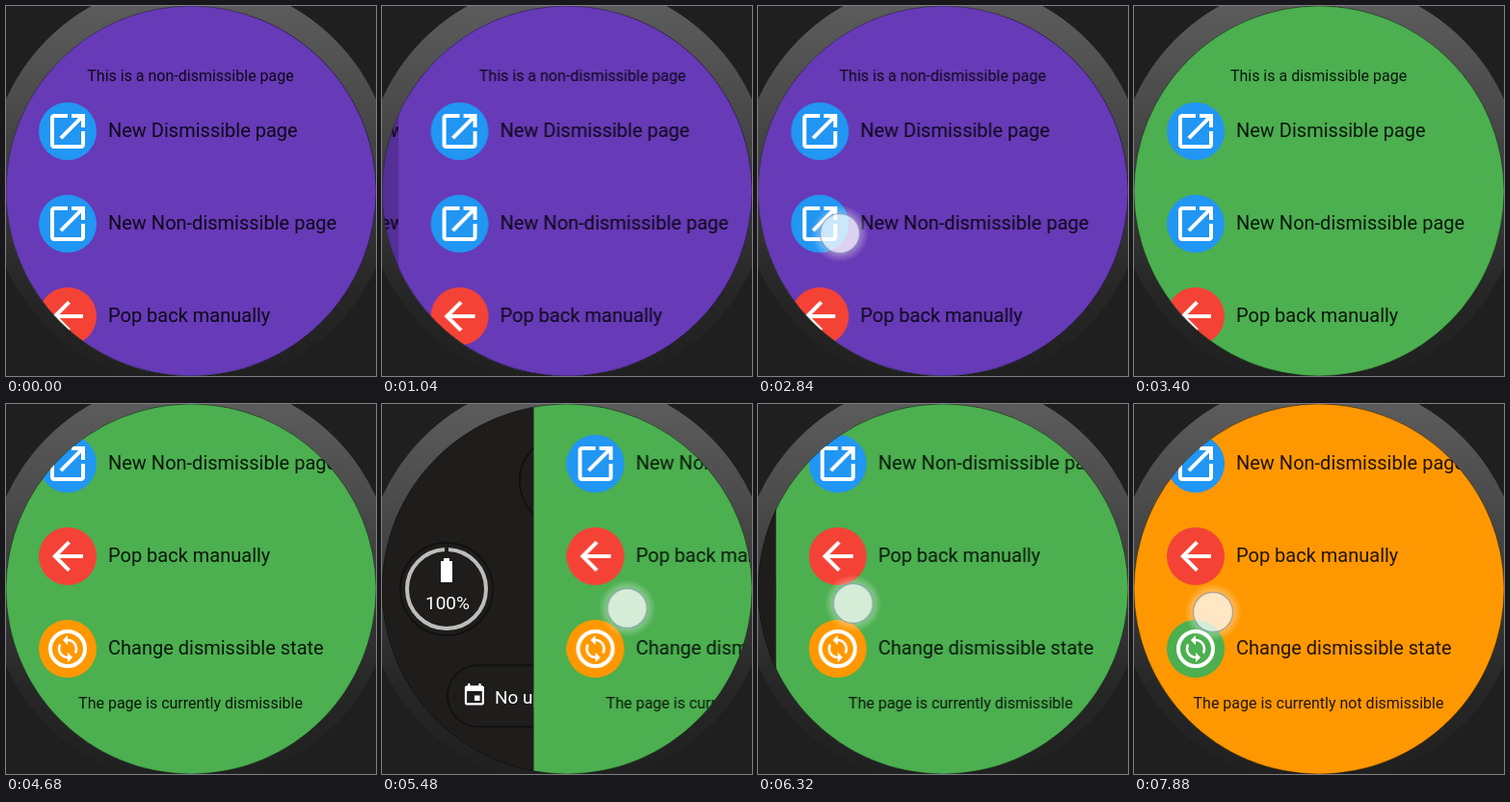
Animation, 384 px wide and 384 px high, one loop 8000 ms. Source, as an HTML page:

```html
<!DOCTYPE html>
<html lang="en">
<head>
<meta charset="utf-8">
<title>Dismissible pages</title>
<style>
  html, body { margin: 0; width: 100%; height: 100%; overflow: hidden; background: #1f1f1f; }
  svg { display: block; width: 384px; height: 384px; font-family: Roboto, sans-serif; }
  .row { font-size: 20px; fill: rgba(0, 0, 0, .87); }
  .note { font-size: 16px; fill: rgba(0, 0, 0, .87); text-anchor: middle; }
  .face { font-size: 19px; fill: #fff; }
  .icon { fill: #fff; }
</style>
</head>
<body>
<svg viewBox="0 0 384 384">
  <defs>
    <clipPath id="screen"><circle cx="192" cy="192" r="192"/></clipPath>
    <linearGradient id="bezel" x2="0" y2="1">
      <stop offset="0" stop-color="#606060"/>
      <stop offset=".3" stop-color="#4b4b4b"/>
      <stop offset=".55" stop-color="#383838"/>
      <stop offset=".75" stop-color="#272727"/>
      <stop offset="1" stop-color="#1f1f1f"/>
    </linearGradient>
    <linearGradient id="edge">
      <stop offset="0" stop-opacity="0"/>
      <stop offset="1" stop-opacity=".2"/>
    </linearGradient>
    <radialGradient id="halo">
      <stop offset=".7" stop-color="#fff" stop-opacity=".32"/>
      <stop offset="1" stop-color="#fff" stop-opacity="0"/>
    </radialGradient>
    <path id="open" d="M19 19H5V5h7V3H5c-1.11 0-2 .9-2 2v14c0 1.1.89 2 2 2h14c1.1 0 2-.9 2-2v-7h-2v7zM14 3v2h3.59l-9.83 9.83 1.41 1.41L19 6.41V10h2V3h-7z"/>
    <path id="back" d="M20 11H7.83l5.59-5.59L12 4l-8 8 8 8 1.41-1.41L7.83 13H20v-2z"/>
    <g id="swap">
      <circle cx="12" cy="12" r="9" fill="none" stroke="#fff" stroke-width="2"/>
      <path transform="translate(12 12) scale(.64) translate(-12 -12)" d="M12 4V1L8 5l4 4V6c3.31 0 6 2.69 6 6 0 1.01-.25 1.97-.7 2.8l1.46 1.46C19.54 15.03 20 13.57 20 12c0-4.42-3.58-8-8-8zm0 14c-3.31 0-6-2.69-6-6 0-1.01.25-1.97.7-2.8L5.24 7.74C4.46 8.97 4 10.43 4 12c0 4.42 3.58 8 8 8v3l4-4-4-4v3z"/>
    </g>
  </defs>

  <circle cx="192" cy="184" r="211" fill="url(#bezel)"/>
  <g clip-path="url(#screen)">
    <g id="watch">
      <rect width="384" height="384" fill="#1f1d1c"/>
      <g fill="none" stroke="#111" stroke-width="2">
        <circle cx="191" cy="80" r="48"/>
        <circle cx="67" cy="192" r="48"/>
        <rect x="68" y="271" width="248" height="64" rx="32"/>
      </g>
      <circle cx="67" cy="192" r="41" fill="none" stroke="#bdbdbd" stroke-width="4"
        pathLength="100" stroke-dasharray="98.4 1.6" stroke-dashoffset="-.8" transform="rotate(-90 67 192)"/>
      <path class="icon" d="M64 160h6v3h3v22h-12v-22h3z"/>
      <text class="face" x="68" y="213" text-anchor="middle">100%</text>
      <path class="icon" transform="translate(82.5 289) scale(1.12)" d="M17 12h-5v5h5v-5zM16 1v2H8V1H6v2H5c-1.11 0-1.99.9-1.99 2L3 19c0 1.1.89 2 2 2h14c1.1 0 2-.9 2-2V5c0-1.1-.9-2-2-2h-1V1h-2zm3 18H5V8h14v11z"/>
      <text class="face" x="117" y="311">No upcoming events</text>
    </g>
    <g id="pages"></g>
    <g id="touch" opacity="0">
      <circle r="30" fill="url(#halo)"/>
      <circle r="20.5" fill="#fff" fill-opacity=".66" stroke="#6d7fa8" stroke-opacity=".5" stroke-width="1.5"/>
    </g>
  </g>
  <circle cx="192" cy="192" r="192" fill="none" stroke="#000" stroke-opacity=".35"/>
</svg>

<script>
const LOOP = 8000, W = 384, TOGGLE = 7160;
const GREEN = '#4caf50', ORANGE = '#ff9800', PURPLE = '#673ab7', BLUE = '#2196f3', RED = '#f44336';
const SETTLE = 'cubic-bezier(.35,.91,.33,.97)';
const $ = id => document.getElementById(id);

const row = (y, color, icon, label) => `
  <circle cx="64" cy="${y}" r="30" fill="${color}"/>
  <use class="icon" href="#${icon}" transform="translate(40 ${y - 24}) scale(2)"/>
  <text class="row" x="106" y="${y + 6}">${label}</text>`;

const note = (y, text, id = '') => `<text class="note" x="191.5" y="${y}" id="${id}">${text}</text>`;

const page = (id, color, title, extra = '') => `
  <g id="${id}">
    <rect id="${id}Edge" x="${-W}" width="${W}" height="${W}" fill="url(#edge)" opacity="0"/>
    <g id="${id}Under">
      <rect id="${id}Back" width="${W}" height="${W}" fill="${color}"/>
      <g id="${id}List">
        ${note(78, title)}
        ${row(130, BLUE, 'open', 'New Dismissible page')}
        ${row(226, BLUE, 'open', 'New Non-dismissible page')}
        ${row(322, RED, 'back', 'Pop back manually')}
        ${extra}
      </g>
    </g>
  </g>`;

const fixed = 'This is a non-dismissible page';
$('pages').innerHTML =
  page('root', GREEN, 'This is a dismissible page',
    `<g id="swapRow">${row(418, ORANGE, 'swap', 'Change dismissible state')}</g>` +
    note(480, 'The page is currently dismissible', 'yes') +
    note(480, 'The page is currently not dismissible', 'no')) +
  page('first', PURPLE, fixed) +
  page('second', PURPLE, fixed);

// keys: [time, value, easing to the next key]
function play(el, keys, style) {
  const all = [[0, keys[0][1]], ...keys, [LOOP, keys[keys.length - 1][1]]];
  el.animate(all.map(([t, v, easing = 'linear']) => ({ offset: t / LOOP, easing, ...style(v) })),
    { duration: LOOP, iterations: Infinity });
}

const moveX = x => ({ transform: `translate(${x}px, 0px)` });
const moveY = y => ({ transform: `translate(0px, ${y}px)` });

// A page slides over another, which follows at a third of the distance
function slide(top, below, keys) {
  play($(top), keys, moveX);
  play($(top + 'Edge'), keys, x => ({ opacity: 1 - x / W }));
  play($(below + 'Under'), keys, x => moveX((x - W) / 3));
}

const toggle = (el, prop, before, after) =>
  play(el, [[TOGGLE, before], [TOGGLE, after]], v => ({ [prop]: v }));

slide('second', 'first', [
  [740, W, SETTLE], [1240, 0], [1720, 0], [1760, 12], [1920, 163], [2000, 236, SETTLE], [2240, W]
]);
slide('first', 'root', [
  [2840, 0], [2880, 10], [3040, 150], [3120, 215, SETTLE], [3400, W]
]);
play($('root'), [
  [5120, 0], [5480, 157, 'ease-out'], [5760, 235], [5920, 235, 'ease-in-out'], [6320, 19, 'ease-out'], [6440, 0]
], moveX);
play($('rootList'), [[3800, 0, 'ease-in-out'], [4320, -150, 'ease-out'], [4520, -164]], moveY);

toggle($('rootBack'), 'fill', GREEN, ORANGE);
toggle($('swapRow').querySelector('circle'), 'fill', ORANGE, GREEN);
toggle($('yes'), 'opacity', 1, 0);
toggle($('no'), 'opacity', 0, 1);

// Each gesture: [time, x, y, easing]; shown from its first to its last key
const gestures = [
  [[640, 64, 226], [760, 64, 226]],
  [[1560, 86, 243], [1720, 86, 243], [1920, 311, 257], [2000, 372, 259]],
  [[2720, 84, 236], [2840, 84, 236], [3040, 290, 246], [3120, 350, 250]],
  [[3720, 215, 290], [3800, 215, 286, 'ease-in-out'], [4320, 215, 126]],
  [[4960, 90, 212], [5120, 90, 212], [5480, 254, 212, 'ease-out'], [5760, 332, 212],
   [5920, 332, 210, 'ease-in-out'], [6320, 99, 207, 'ease-out'], [6440, 80, 207], [6720, 78, 207]],
  [[7040, 66, 254], [7200, 66, 254]],
  [[7880, 82, 216], [LOOP, 82, 216]]
];
const state = (x, y, on) => ({ transform: `translate(${x}px, ${y}px)`, opacity: on });
const steps = gestures.flatMap(g => {
  const [t0, x0, y0] = g[0], [t1, x1, y1] = g[g.length - 1];
  return [
    { offset: t0 / LOOP, ...state(x0, y0, 0) },
    ...g.map(([t, x, y, easing = 'linear']) => ({ offset: t / LOOP, easing, ...state(x, y, 1) })),
    { offset: t1 / LOOP, ...state(x1, y1, 0) }
  ];
});
$('touch').animate([{ offset: 0, ...state(64, 226, 0) }, ...steps], { duration: LOOP, iterations: Infinity });
</script>
</body>
</html>
```
